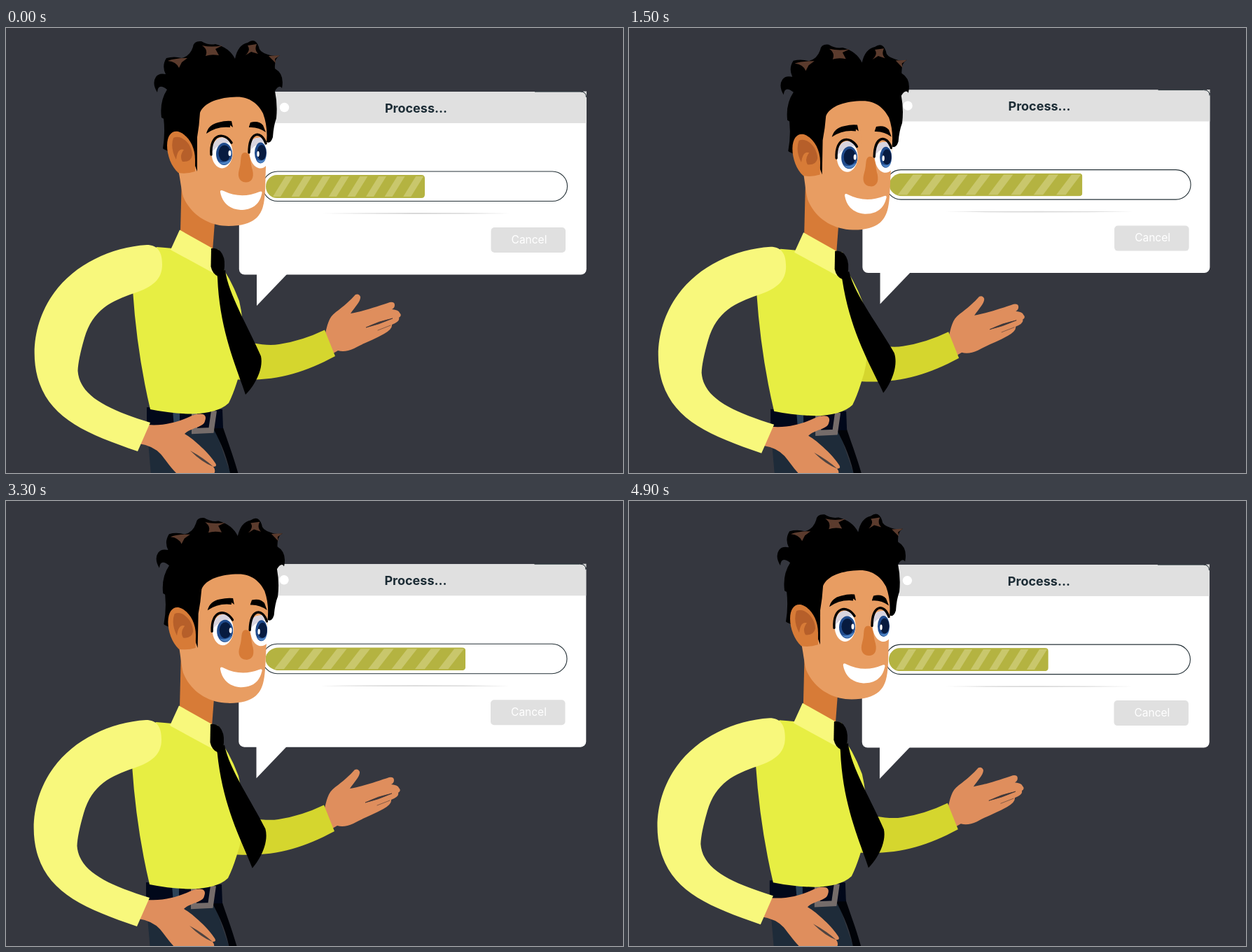
Write an HTML page that moves like this. It is 881 px wide and 636 px high and loops after 5 s.

```html
<!DOCTYPE html>
<html lang="en">
<head>
<meta charset="utf-8">
<title>Process</title>
<style>
html, body { margin: 0; height: 100%; overflow: hidden; background: #35373f; }
svg { display: block; width: 100%; height: 100%; }
text { font-family: Inter, "Open Sans", sans-serif; text-anchor: middle; }
.skin { fill: #e89d62; }
.shade { fill: #d77b37; }
.hand { fill: #df8e5d; }
.pale { fill: #f8f87c; }
.gap { fill: none; stroke: #4a3a38; stroke-linecap: round; }
.lash { fill: none; stroke: #000; stroke-width: 3.4; stroke-linecap: round; }
</style>
</head>
<body>
<svg viewBox="0 0 881 636" preserveAspectRatio="none">
<defs>
  <clipPath id="barClip"><path d="M16 0H222Q227 0 227 5V28Q227 33 222 33H16A16 16.5 0 0 1 16 0Z"/></clipPath>
  <clipPath id="eyeL"><ellipse cx="308.500" cy="178.500" rx="15" ry="22"/></clipPath>
  <clipPath id="eyeR"><path d="M372 156V196Q367 202 360 200C343 194 344 157 359 157Z"/></clipPath>
</defs>
<rect width="881" height="636" fill="#35373f"/>

<g id="panel">
  <rect x="332.800" y="91" width="496" height="261.500" rx="8" fill="#fff"/>
  <path d="M332.800 136V99Q332.800 91 341 91H820Q828.800 91 828.800 99V136Z" fill="#e0e0e0"/>
  <path d="M824 90.500H829V96Z" fill="#d8d8d8"/>
  <path d="M755 91H820Q828.500 91 828.500 99" fill="none" stroke="#263238"/>
  <path d="M358 351H402L358 397Z" fill="#fff"/>
  <circle cx="397.500" cy="113.500" r="6.700" fill="#fff"/>
  <text x="585.500" y="120.500" font-size="18" font-weight="700" fill="#1c2c35">Process...</text>
  <rect x="366.500" y="205" width="435" height="42.500" rx="21.200" fill="#fff" stroke="#263238" stroke-width="1.100"/>
  <g id="bar" clip-path="url(#barClip)">
    <rect width="227" height="33" fill="#b4b341"/>
    <path id="stripes" fill="#c9c76c"/>
  </g>
  <path d="M450 265Q585 263.200 720 265Q585 266.800 450 265Z" fill="#d9d9d9"/>
  <rect x="692.500" y="285" width="106.500" height="36" rx="5" fill="#e0e0e0"/>
  <text x="747" y="307.500" font-size="15.500" fill="#fff">Cancel</text>
</g>

<g id="farArm">
  <path class="hand" d="M455 440C459 425 460 414 471 406C482 398 492 389 499 381Q504 379 506 384C507 390 498 399 492 408C510 405 533 397 548 392Q555 391 555 396Q555 400 551 402Q561 403 562 407Q566 411 561 414Q563 419 551 424Q552 430 540 437C524 446 509 451 497 458Q484 464 474 461L462 468Z"/>
  <path d="M514 428Q532 419 552 415Q532 424 514 428Z" fill="#35373f" stroke="#4a3a38" stroke-width=".8"/>
  <path class="gap" d="M549 425L531 432" opacity=".6"/>
  <path d="M320 442Q365 456 390 452Q423 447 455 431.500L470 469C421 495 383 506 320 502Z" fill="#d5d62e"/>
</g>

<g id="neck"><path class="shade" d="M251 210L249 292L295 318L299 265Z"/></g>

<g id="body">
  <path d="M201 568L208 650H325L297 568Z" fill="#1e2b39"/>
  <path d="M294 568H309C316 590 327 617 335 650H322C318 612 303 587 294 568Z" fill="#010308"/>
  <path d="M201 542L309 545L310 572L201 573Z" fill="#01081a"/>
  <path d="M238 546H248V571H240Z" fill="#2d4358"/>
  <path d="M269 548V576L293 575L297 547" fill="none" stroke="#756c6a" stroke-width="8"/>
  <path d="M215 313Q228 314 238 315L300 330Q320 355 333 390Q340 420 339 455Q339 480 331 502Q325 522 318 536Q302 551 265 551.500Q235 551 206 545Q187 465 181 375Z" fill="#e7ee43"/>
  <path class="hand" d="M202 567C225 569 245 563 259 557Q274 550 281 552Q287 554 284 562C282 571 264 571 255 580C269 588 291 609 299 622Q302 627 296 627Q300 632 297 637L290 650H260C241 638 231 621 221 609Q210 597 190 594Z"/>
  <path d="M263 604Q283 615 296 627Q280 621 263 604Z" fill="#1e2b39" opacity=".75"/>
  <path class="pale" d="M201 310C150 313 98 338 69 378C42 415 35 461 45 499C61 557 112 579 188 605L206 564C145 545 105 526 102.500 490Q103 474 112 443C124 402 151 390 183 379C210 370 223 359 223 338C223 319 216 310 201 310Z"/>
</g>

<g id="collar">
  <path class="pale" d="M248 288.500L295 315L304 317L301 353L235 317Z"/>
</g>
<g id="tie"><path d="M301 348L313 346C317 380 348 431 364 469C368 488 355 511 342 524C329 484 305 433 302 357Z"/></g>
<g id="knot"><path d="M293 315Q300 314 306 319Q313 327 312 341Q311 355 303 355Q295 352 292.500 341Z"/></g>

<g id="head">
  <path d="M225 173L240 180L273 196L290 125L268 80L222 112Q229 142 224 172Z"/>
  <path class="skin" d="M264 125L276 100L345 90L371 115L373 160Q371 175 371 198L370 232C369 250 367 263 357 272Q344 283 318 283C289 283 264 267 253 241C250 230 249 216 245 198L268 188Z"/>
  <g clip-path="url(#eyeL)">
    <rect x="290" y="154" width="38" height="50" fill="#fff"/>
    <path d="M290 150H326V164Q306 161 293 179Z" fill="#d8d4de"/>
    <ellipse cx="311.500" cy="180" rx="11.500" ry="16" fill="#204b8c"/>
    <path d="M304 191Q312 194 321 187Q319 195 312 195Q307 195 304 191Z" fill="#4c82c3"/>
    <ellipse cx="312" cy="179" rx="8.500" ry="11.500" fill="#071b40"/>
    <ellipse cx="319.500" cy="179" rx="2" ry="4" fill="#fff"/>
  </g>
  <g clip-path="url(#eyeR)">
    <rect x="344" y="154" width="30" height="48" fill="#fff"/>
    <path d="M346 150H374V163Q358 162 348 176Z" fill="#d8d4de"/>
    <ellipse cx="363.500" cy="178.500" rx="8.500" ry="15" fill="#204b8c"/>
    <path d="M358 188Q365 192 371 186Q369 193 364 193Q360 192 358 188Z" fill="#4c82c3"/>
    <ellipse cx="365" cy="178" rx="6.500" ry="11" fill="#071b40"/>
    <ellipse cx="360" cy="180" rx="1.700" ry="4" fill="#fff"/>
  </g>
  <path class="skin" id="lidL"/><path class="lash" id="lashL"/>
  <path class="skin" id="lidR"/><path class="lash" id="lashR"/>
  <path class="shade" d="M341 178C350 178 348 190 352 203C355 216 349 221 342 220.500C333 220 330 212 333 202C337 190 333 179 341 178Z"/>
  <path d="M306 235Q305 230 311 233Q336 245 362 234Q367 232 365 238C361 255 348 260 335 260C319 259 309 250 306 235Z" fill="#fff"/>
  <path d="M286 151Q289 138 303 135Q314 132 322 133L324 142L320 139V142Q301 140 286 151Z"/>
  <path d="M347 141L349 135Q361 132 367 139L371 149Q360 141 347 142Z"/>
  <path d="M273 205Q263 183 262 150L222 128Q219 105 230 88Q217 78 216 92Q208 79 214 70Q218 64 228 66Q222 54 229 43Q240 40 251 43Q263 40 267 27Q268 18 279 19Q289 25 299 23Q319 28 327 44Q331 24 345 21Q356 13 361 27Q361 34 374 38Q381 41 391 39Q383 43 384 58Q398 66 394 86Q390 80 384 90Q388 109 386 129Q382 140 381 156Q378 166 372 163Q374 141 367 122C360 108 347 98 329 98.500C305 99 283 106 277 121Q276 139 273 156Z"/>
  <path d="M231 47Q241 43 259 43L251 49L247 57Q243 48 231 47ZM280 25Q294 28 309 25L299 30L304 39Q293 37 285 40Q289 31 280 25ZM345 25L358 23Q354 31 360 37L350 34L342 39Q350 31 345 25ZM375 40L391 39L384 44L385 50Z" fill="#5b3b2d"/>
  <path class="shade" d="M246 207C236 198 230 182 230 168C230 153 237 146 246 148C259 152 270 168 270 188V205Q258 209 246 207Z"/>
  <path d="M239 157C250 151 266 166 266 182Q264 192 252 191Q247 183 254 174Q245 171 243 188Q234 171 239 157Z" fill="#b65f2a"/>
</g>
</svg>
<script>
const $ = id => document.getElementById(id);
const LOOP = 5000, STEP = 100;
const { PI, sin, cos, abs, min, max, floor } = Math;

let d = "";
for (let i = 0; i < 8; i++) d += `M${10 + 26.6 * i} 31h11l18 -29h-11z`;
$("stripes").setAttribute("d", d);

// lash curves, open and closed, as cubic points, with the lid's side limits
const eyes = {
  L: { open: [293, 181, 291, 150, 312, 148, 322, 164], shut: [296, 200, 303, 199, 317, 198, 325, 193], sides: [286, 328] },
  R: { open: [347, 178, 347, 148, 364, 145, 371, 165], shut: [349, 190, 355, 189, 365, 191, 371, 190], sides: [343, 372] }
};

function setEyes(k) {
  for (const id in eyes) {
    const { open, shut, sides: [l, r] } = eyes[id];
    const p = open.map((v, i) => v + (shut[i] - v) * k);
    const curve = `${p[0]} ${p[1]}C${p.slice(2)}`;
    $("lash" + id).setAttribute("d", "M" + curve);
    $("lid" + id).setAttribute("d", `M${l} 145V${p[1]}L${curve}L${r} ${p[7]}V145Z`);
  }
}

function move(id, x, y, extra = "") {
  $(id).setAttribute("transform", `translate(${x} ${y}) ${extra}`);
}

function swing(t) {
  const peak = 1700;
  return t < peak ? sin(PI / 2 * t / peak)
                  : 0.5 + 0.5 * cos(PI * (t - peak) / (LOOP - peak));
}

function draw(t) {
  const turn = 2 * PI / LOOP;
  const bob = sin(PI * t / LOOP);
  const sway = 1.2 * sin(turn * t);

  move("panel", sway * 0.5, 1.5 * (cos(turn * (t - 4400)) - cos(turn * 4400)));
  const grow = min(1, (min(t, LOOP - t) / 2100) ** 1.46);
  move("bar", 371, 210, `scale(${1 + grow * 80 / 227} 1)`);

  for (const id of ["body", "farArm"]) move(id, sway, 3.4 * bob);
  for (const id of ["neck", "collar", "knot"]) move(id, sway, 4.6 * bob);
  move("tie", sway, 3.8 * bob, `rotate(${-6.6 * swing(t)} 303 345)`);
  move("head", sway, 5.6 * bob, `rotate(${1.3 * bob} 270 290)`);
  setEyes(max(0, 1 - abs(t - 2100) / 200));
}

function tick(now) {
  draw(floor(now % LOOP / STEP) * STEP);
  requestAnimationFrame(tick);
}
draw(0);
requestAnimationFrame(tick);
</script>
</body>
</html>
```
